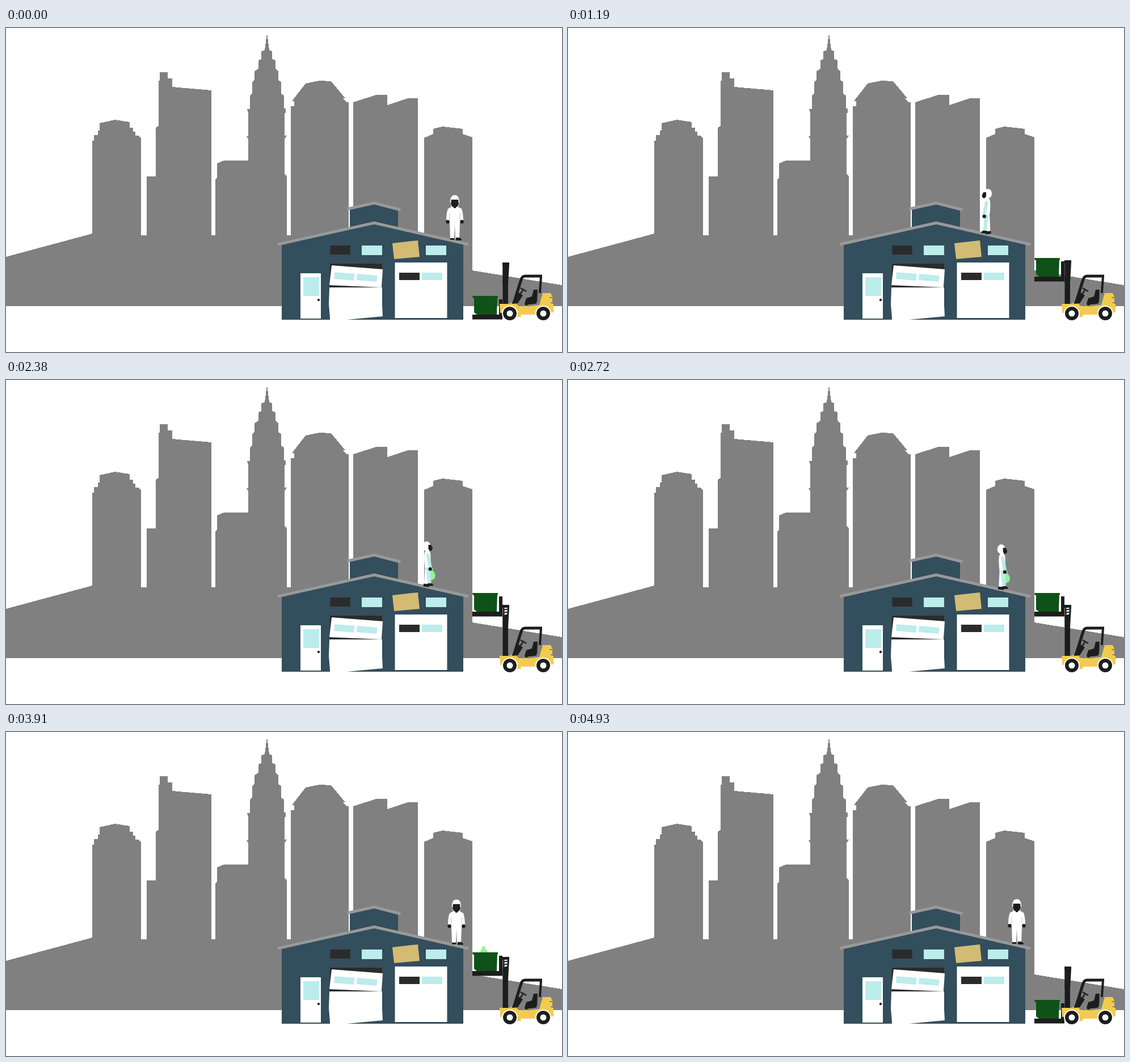
These frames come from a looping animation (980 by 572 pixels, 6970 ms). An HTML page:

```html
<!DOCTYPE html>
<html lang="en">
<head>
<meta charset="utf-8">
<title>Warehouse cleanup</title>
<style>
html, body { margin: 0; width: 100%; height: 100%; overflow: hidden; background: #fff; }
svg { display: block; width: 980px; height: 572px; }
.city { fill: #808080; shape-rendering: crispEdges; }
.wall { fill: #334e5c; }
.roof { fill: none; stroke: #999; stroke-width: 5; }
.white { fill: #fff; }
.dark { fill: #2b2b2b; }
.glass { fill: #bcecec; }
.black { fill: #1c1e1e; }
.bar { fill: none; stroke: #1c1e1e; }
.yellow { fill: #f3cb4c; }
.green { fill: #0f5217; }
.bag { fill: #8ef592; }
</style>
</head>
<body>
<svg viewBox="0 0 980 572">
  <defs>
    <path id="sack" class="bag" d="M-2-9L-4-12L0-11L4-12L2-8Q8-4 7 3Q6 9 0 9Q-7 9-7 3Q-7-4-2-9Z"/>
    <g id="wheel">
      <circle r="14" class="white"/><circle r="12" class="black"/><circle r="5.5" class="white"/>
    </g>
  </defs>

  <path class="city" d="M0 404L152 363V199H155V189H162V181H165V168L192 162L218 166V176H224V183H228V190H233L238 195V366H248V262H264V176L269 173V93H271V78H285V89H293V104L362 110V366H369V267L372 264V239L384 234H427V196L424 191H427V150L425 143H430V119L434 116V95L438 92V76L445 72V57L450 55V41L456 39L460 9L464 39L469 41V55L475 57V72L480 76V92L485 95V116L490 119V142H493V150H491V190H495L491 196V258L495 261V366H502V138H508V129H504L528 98L552 93L573 94L598 124H594L600 131H604V366H612V131L653 118H672V136L709 124H726V400H737V194L753 187V178L769 174L805 178V187L822 193V428L980 454V491H0Z"/>

  <path class="wall" d="M606 320L649 309L691 320V360H606Z"/>
  <path class="roof" d="M601.5 319.5L649 309L695.5 321"/>
  <path class="wall" d="M486 381L649 344L806 381V515H486Z"/>
  <path class="roof" d="M479 382L649 344L815 382"/>
  <path class="dark" d="M571.500 384h35v16h-35z"/>
  <path class="glass" d="M627 384h36v17h-36zM740 384h36v17h-36z"/>
  <path fill="#d3bb74" d="M681 380L726 375L729 404L684 408Z"/>

  <path class="white" d="M519 433h36v80h-36z"/>
  <path class="glass" d="M524 440h28v33h-28z"/>
  <circle class="dark" cx="551" cy="480" r="2.200"/>

  <path class="dark" d="M571 416h92v44h-92z"/>
  <path class="white" d="M570 458H663V490L664 509L601 515H571V511L569 488Z"/>
  <path class="dark" d="M570 453L630 456V458H570Z"/>
  <path class="white" d="M574 419L664 426L662 458L570 454Z"/>
  <path class="glass" d="M579 431L615 434L613 446L578 443ZM619 434L655 437L653 448L618 445Z"/>

  <path class="white" d="M685.500 414h92v98h-92z"/>
  <path class="dark" d="M693 432h36v13h-36z"/>
  <path class="glass" d="M733 432h36v13h-36z"/>

  <g id="front">
    <path class="white" d="M-8-67Q-8-80 0-80Q8-80 8-67L6-59L12-56Q15-48 15-34H10L9-30L8-3H1L0-28L-1-3H-8L-9-34H-15Q-15-49-12-56L-6-59Z"/>
    <path class="black" d="M-6-72H6L7-64L4-59H2V-57H-2V-59H-4L-7-64Z"/>
    <path fill="none" stroke="#aaa" d="M-9.500-48L-9-35M9.500-48L9-35" stroke-width=".7"/>
    <path class="black" d="M-8-4H-1V-1H-8ZM2-5H8L12-2V0H2Z"/>
    <circle class="black" cx="-12.500" cy="-33" r="3.200"/>
    <circle class="black" cx="12.500" cy="-33" r="3.200"/>
  </g>

  <g id="side">
    <use id="held" href="#sack"/>
    <g id="farLeg">
      <path class="white" d="M-5-38H5L3-3H-3Z"/>
      <path class="black" d="M-4-4H3L6-2V1H-4Z"/>
    </g>
    <g id="nearLeg">
      <path class="glass" d="M-4-36H4L3-3H-3Z"/>
      <path class="black" d="M-4-5H3L6-2V0H-4Z"/>
    </g>
    <path class="white" d="M-6-57Q-5-63-1-63H2Q5-60 5-54V-33H-5Q-7-46-6-57Z"/>
    <ellipse class="white" cx="-2" cy="-70.500" rx="7" ry="8.500"/>
    <path class="black" d="M1-73H6L7-70Q9-69 8-65Q6-61 3-63L1-66Z"/>
    <g id="arm">
      <path class="glass" d="M-3-56Q0-60 3-56L3.500-31H-2.500Z"/>
      <circle class="black" cy="-30" r="3.200"/>
    </g>
  </g>

  <use id="thrown" href="#sack"/>

  <g id="mast">
    <path class="black" d="M875 0h12v5h-12z"/>
    <path class="bar" stroke-width="3" d="M877 2V40M885.500 4L883.500 40"/>
    <path class="bar" stroke-width="2" d="M877 9L886 7M877 14L886 12M877 19L886 17"/>
  </g>
  <path class="black" d="M875.500 415h9.500v73h-9.500z"/>
  <g id="load">
    <path class="green" d="M822 0H867V3H866L865 33H830L825 29V4H823Z"/>
    <path class="black" d="M869 6h6v35.500H822V33H869Z"/>
  </g>

  <path class="yellow" d="M870 487H888L894 482L904 491H918L940 489L946 468H960L963 474V487H965V502H958L936 504L930 506H908L907 510H901L899 503H871Z"/>
  <path stroke="#808080" stroke-width="2" d="M958 476H966M960 485H966"/>
  <path class="bar" stroke-width="5" d="M895 486L908 444Q910 438 915 438H945"/>
  <path class="bar" stroke-width="4" d="M943 438L941 468"/>
  <path class="black" d="M891 487L902 466L911 472L902 486ZM914 487L917 477L927 474L930 462H937L936 485L930 490H916Z"/>
  <path class="bar" stroke-width="2.500" d="M907 459L917 465M911 463L906 470"/>
  <path fill="none" stroke="#808080" stroke-width="3" d="M919 490L936 488L941 470"/>
  <use href="#wheel" x="888" y="504"/>
  <use href="#wheel" x="947" y="504"/>
</svg>
<script>
const STEP = 170, LOOP = 6970, LAST = 29;
const el = id => document.getElementById(id);
const move = (id, x, y, rest = "") =>
  el(id).setAttribute("transform", `translate(${x} ${y}) ${rest}`);
const show = (id, on) => el(id).style.display = on ? "" : "none";

// Linear interpolation through [step, value] keys, clamped at both ends.
function track(keys, i) {
  if (i <= keys[0][0]) return keys[0][1];
  for (let k = 1; k < keys.length; k++) {
    const [a, u] = keys[k - 1], [b, v] = keys[k];
    if (i <= b) return u + (v - u) * (i - a) / (b - a);
  }
  return keys[keys.length - 1][1];
}

const WALK = [[2, 791], [3, 785], [4, 773], [7, 738], [10, 705], [11, 710], [18, 788], [19, 794], [23, 794], [29, 791]];
const LIFT = [[2, 473], [3, 466], [4, 451], [9, 376], [22, 376], [23, 389], [29, 473]];
const MAST = [[6, 414], [7, 410], [9, 397], [23, 397], [28, 414]];
const FLY_X = [[19, 816], [20, 832], [21, 842]];
const FLY_Y = [[19, 350], [20, 353], [21, 366], [22, 377]];

function person(i) {
  const x = track(WALK, i);
  const y = 342.5 + (x - 649) * 0.229;
  const side = i >= 2 && i <= 19;
  show("front", !side);
  show("side", side);
  if (!side) return move("front", x, y);

  const right = i > 10;
  const fore = (i % 2 === 1) !== right ? 1 : -1;
  const arm = i === 19 ? -75 : fore > 0 ? -9 : 4;
  move("side", x, y, right ? "" : "scale(-1 1)");
  el("arm").setAttribute("transform", `rotate(${arm} 0 -57)`);
  el("nearLeg").setAttribute("transform", `rotate(${-6 * fore} 0 -36)`);
  el("farLeg").setAttribute("transform", `rotate(${6 * fore} 0 -36)`);
  show("held", i > 10 && i < 19);
  move("held", fore > 0 ? 6 : -6, -20);
}

function draw(i) {
  const load = track(LIFT, i);
  person(i);
  move("load", 0, load);
  move("mast", 0, track(MAST, i));
  show("thrown", i >= 19 && i < 28);
  const sackY = i < 22 ? track(FLY_Y, i) : load + 1 + Math.max(0, i - 23) * 3;
  move("thrown", track(FLY_X, i), sackY);
}

const start = performance.now();
function tick(now) {
  const t = Math.max(0, now - start) % LOOP;
  draw(Math.min(LAST, Math.floor(t / STEP)));
  requestAnimationFrame(tick);
}
draw(0);
requestAnimationFrame(tick);
</script>
</body>
</html>
```
